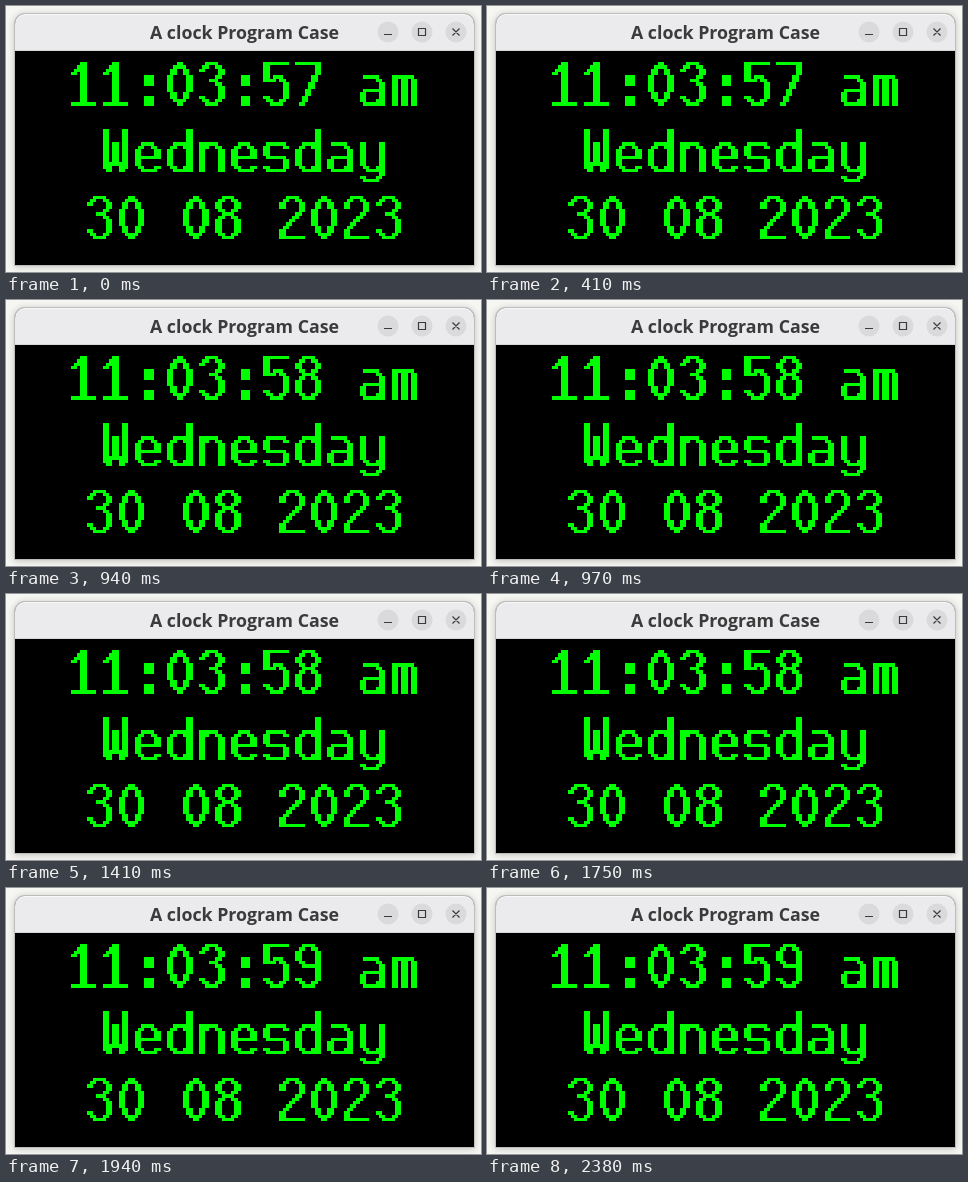
An HTML page with a canvas for the animation above (2820 ms loop, 475x266 px).

```html
<!DOCTYPE html>
<html lang="en">
<head>
<meta charset="utf-8">
<title>Clock</title>
<style>
  html, body { margin: 0; width: 475px; height: 266px; overflow: hidden; background: #f6f6f3; }
  .window {
    position: absolute; left: 9px; top: 8px; width: 459px; height: 251px;
    border-radius: 10px 10px 0 0; background: #000;
    box-shadow: 0 0 0 1px #bdbdbd, 0 1px 7px 1px #c2c0bd;
  }
  .bar {
    position: absolute; inset: 0 0 auto; height: 37px; box-sizing: border-box;
    border-radius: 10px 10px 0 0; border-bottom: 1px solid #d8d6d8;
    background: #ebebee; box-shadow: inset 0 1px #f8f8f8;
    font: bold 17.8px/37px "Open Sans", "Noto Sans", sans-serif;
    color: #3b3b3b; text-align: center; white-space: nowrap;
  }
  svg, canvas { position: absolute; left: 0; top: 0; }
</style>
</head>
<body>
<div class="window"><div class="bar">A clock Program Case</div></div>
<svg width="475" height="266" fill="none" stroke="#3b3b3b" stroke-width="1.2">
  <g fill="#dad9db" stroke="none">
    <circle cx="382" cy="26" r="10.5"/><circle cx="416" cy="26" r="10.5"/><circle cx="450" cy="26" r="10.5"/>
  </g>
  <path d="M378 28.5h8M412.5 22.5h7v7h-7zM446.5 22.5l7 7m0-7l-7 7"/>
</svg>
<canvas id="screen" width="475" height="266" role="img"></canvas>
<script>
const LOOP = 2820;
const UNIT_X = 3.21, UNIT_Y = 3.35, CELL = 10 * UNIT_X;
const CENTER = 238, TOP = 52.7, LINE_STEP = 66.8;

// Pen strokes on a grid: each point is column then row in base 36, "/" lifts the pen.
const GLYPHS = {
  0: '31 13 14 05 09 1a 1b 3d 5b 5a 69 65 54 53 31',
  1: '04 31 3d/0d 6d',
  2: '04 03 21 41 63 65 0b 0d 6d',
  3: '03 21 41 63 64 46 36 46 68 6b 4d 2d 0b',
  5: '61 01 06 16 35 45 67 6b 4d 2d 0b',
  7: '01 61 63 1d',
  8: '21 41 63 64 46 26 04 03 21/26 08 0b 2d 4d 6b 68 46',
  9: '66 47 27 05 03 21 41 63 6b 4d 2d 0b',
  ':': '35 45 46 36 37 47/3b 4b 4c 3c 3d 4d',
  W: '01 0c 1d/61 6c 5d/35 3a 1c/3a 5c',
  a: '15 45 67 6d/69 19 0a 0c 1d 4d 6b',
  d: '61 6d/67 45 25 07 0b 2d 4d 6b',
  e: '09 69 67 45 25 07 0b 2d 5d 6c',
  m: '05 0d/05 55 66 6d/36 3d',
  n: '05 0d/07 25 45 67 6d',
  s: '66 55 15 06 08 19 59 6a 6c 5d 1d 0c',
  y: '05 0b 2d 4d 6b/65 6e 4g 2g 0f'
};

// Start time and the seconds shown from then on.
const TICKS = [[0, 57], [940, 58], [1940, 59]];

const screen = document.getElementById('screen');
const ctx = screen.getContext('2d');
ctx.fillStyle = '#00ff00';

function dot(x, y, col, row) {
  const left = Math.round(x + (col + 1) * UNIT_X);
  const top = Math.round(y + row * UNIT_Y);
  ctx.fillRect(left, top,
    Math.round(x + (col + 3) * UNIT_X) - left,
    Math.round(y + (row + 1) * UNIT_Y) - top);
}

function drawGlyph(char, x, y) {
  for (const stroke of GLYPHS[char].split('/')) {
    const points = stroke.split(' ').map(p => [...p].map(c => parseInt(c, 36)));
    let [px, py] = points[0];
    dot(x, y, px, py);
    for (const [qx, qy] of points.slice(1)) {
      const steps = Math.max(Math.abs(qx - px), Math.abs(qy - py));
      for (let i = 1; i <= steps; i++) {
        dot(x, y, Math.round(px + (qx - px) * i / steps), Math.round(py + (qy - py) * i / steps));
      }
      [px, py] = [qx, qy];
    }
  }
}

function drawLine(text, y) {
  const x = CENTER - text.length * CELL / 2;
  [...text].forEach((char, i) => {
    if (char !== ' ') drawGlyph(char, x + i * CELL, y);
  });
}

let shown = '';
function render(time) {
  const [, seconds] = TICKS.findLast(([from]) => from <= time);
  const clock = `11:03:${seconds} am`;
  if (clock === shown) return;
  shown = clock;
  const lines = [clock, 'Wednesday', '30 08 2023'];
  screen.setAttribute('aria-label', lines.join(', '));
  ctx.clearRect(0, 0, 475, 266);
  lines.forEach((line, i) => drawLine(line, TOP + i * LINE_STEP));
}

const start = performance.now();
function tick() {
  render((performance.now() - start) % LOOP);
  requestAnimationFrame(tick);
}
tick();
</script>
</body>
</html>
```
